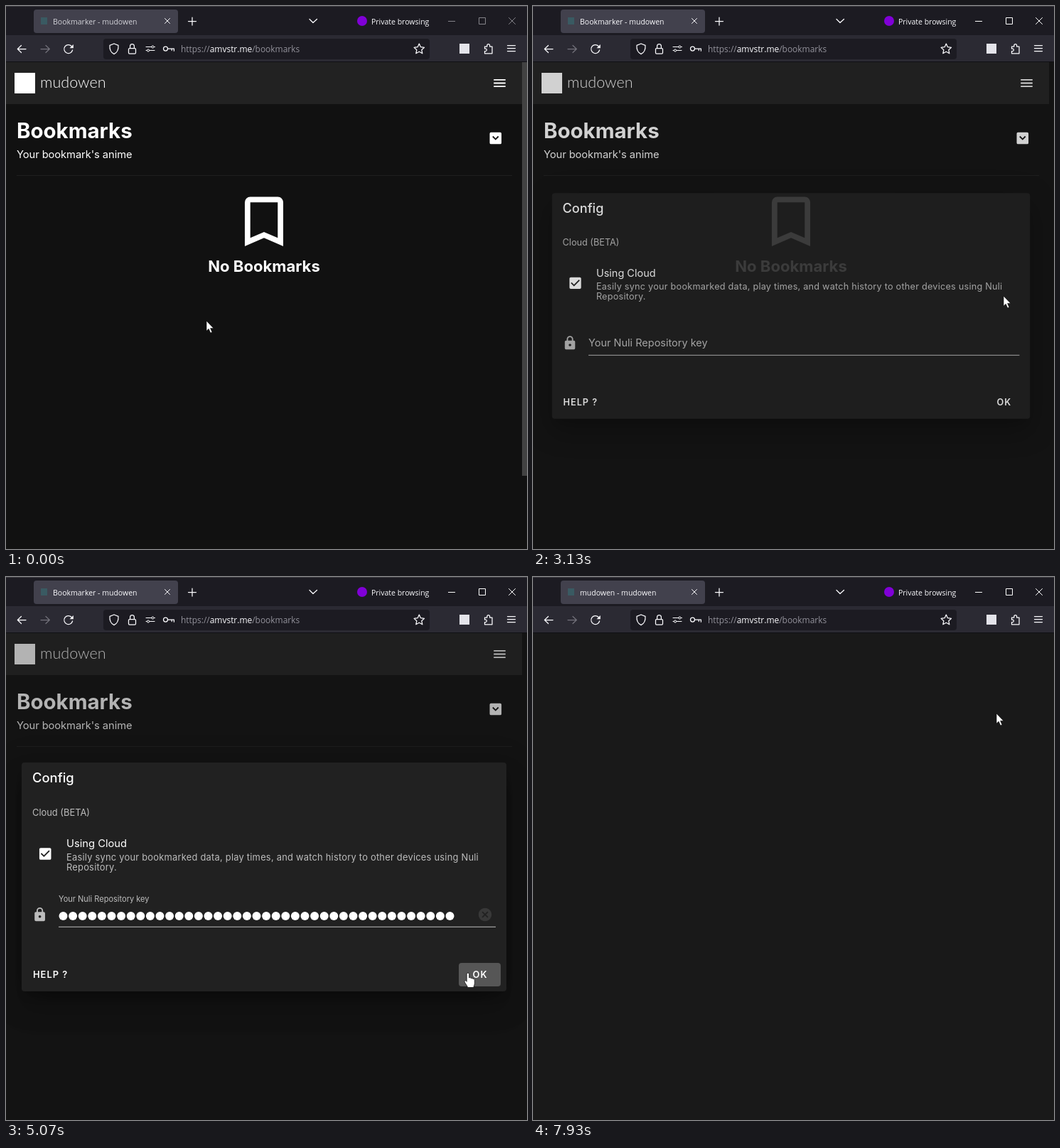
Recreate the animation shown at these times as an HTML page. Size 733x764 px, loop 8000 ms.

```html
<!DOCTYPE html>
<html lang="en">
<head>
<meta charset="utf-8">
<title>Bookmarks</title>
<style>
html, body { margin: 0; width: 100%; height: 100%; overflow: hidden; background: #111; }
svg { display: block; width: 733px; height: 764px; }
text { font-family: Inter, sans-serif; white-space: pre; }
text.ui { font-family: "Open Sans", "Noto Sans", sans-serif; }
text.brand { font-family: Lato, sans-serif; }
.line { fill: none; stroke: #fbfbfe; stroke-width: 1.25; stroke-linecap: round; stroke-linejoin: round; }
.thin { stroke-width: 1; }
</style>
</head>
<body>
<script>
const FPS = 15, LOOP = 8000, Z = 0.92;
const BRAND = 'mudowen', STORE = 'Nuli Repository', HOST = 'amvstr.me';
const SOFT = 'rgba(255,255,255,.7)';

const ICON = {
  menu: 'M3,6H21V8H3V6M3,11H21V13H3V11M3,16H21V18H3V16Z',
  down: 'M5,3H19A2,2 0 0,1 21,5V19A2,2 0 0,1 19,21H5A2,2 0 0,1 3,19V5A2,2 0 0,1 5,3M12,15L17,10L15.59,8.58L12,12.17L8.41,8.58L7,10L12,15Z',
  bookmark: 'M17,18L12,15.82L7,18V5H17M17,3H7A2,2 0 0,0 5,5V21L12,18L19,21V5C19,3.89 18.1,3 17,3Z',
  check: 'M10,17L5,12L6.41,10.58L10,14.17L17.59,6.58L19,8M19,3H5C3.89,3 3,3.89 3,5V19A2,2 0 0,0 5,21H19A2,2 0 0,0 21,19V5C21,3.89 20.1,3 19,3Z',
  lock: 'M12,17A2,2 0 0,0 14,15C14,13.89 13.1,13 12,13A2,2 0 0,0 10,15A2,2 0 0,0 12,17M18,8A2,2 0 0,1 20,10V20A2,2 0 0,1 18,22H6A2,2 0 0,1 4,20V10C4,8.89 4.9,8 6,8H7V6A5,5 0 0,1 12,1A5,5 0 0,1 17,6V8H18M12,3A3,3 0 0,0 9,6V8H15V6A3,3 0 0,0 12,3Z',
  clear: 'M12,2C17.53,2 22,6.47 22,12C22,17.53 17.53,22 12,22C6.47,22 2,17.53 2,12C2,6.47 6.47,2 12,2M15.59,7L12,10.59L8.41,7L7,8.41L10.59,12L7,15.59L8.41,17L12,13.41L15.59,17L17,15.59L13.41,12L17,8.41L15.59,7Z'
};

const rect = (x, y, w, h, fill, more = '') =>
  `<rect x="${x}" y="${y}" width="${w}" height="${h}" fill="${fill}" ${more}/>`;
const text = (x, y, size, str, fill = '#fff', more = '') =>
  `<text x="${x}" y="${y}" font-size="${size}" fill="${fill}" ${more}>${str}</text>`;
const line = (d, kind = '', more = '') => `<path class="line ${kind}" d="${d}" ${more}/>`;
const icon = (name, cx, cy, fill = '#fff', k = Z, more = '') =>
  `<path d="${ICON[name]}" fill="${fill}" fill-rule="evenodd" transform="translate(${cx - 12 * k} ${cy - 12 * k}) scale(${k})" ${more}/>`;
const group = (id, inner, more = '') => `<g id="${id}" ${more}>${inner}</g>`;
const cross = (x, y, r) => `M${x - r} ${y - r}L${x + r} ${y + r}M${x + r} ${y - r}L${x - r} ${y + r}`;

// Layered box shadow: [offset, blur, spread, alpha]
const shadow = (x, y, w, h, layers) => layers.map(([dy, blur, s, a]) =>
  rect(x - s, y + dy - s, w + 2 * s, h + 2 * s, '#000', `rx="4" opacity="${a}" style="filter:blur(${blur / 2}px)"`)).join('');

function star(cx, cy, r) {
  const pts = Array.from({ length: 10 }, (_, i) => {
    const a = -Math.PI / 2 + i * Math.PI / 5, q = i % 2 ? r * 0.48 : r;
    return `${(cx + q * Math.cos(a)).toFixed(1)} ${(cy + q * Math.sin(a)).toFixed(1)}`;
  });
  return `M${pts.join('L')}Z`;
}

function browser() {
  return rect(0, 0, 733, 41, '#1c1b22') + rect(0, 0, 733, 1, '#3d3c42') +
    rect(39, 5, 203, 33, '#42414d', 'rx="4"') +
    rect(49, 16, 9, 10, '#3a5a62', 'id="favicon"') +
    '<ellipse id="busy" cy="21" fill="#b9b9c4"/>' +
    text(66, 26, 10.5, '', '#fbfbfe', 'class="ui" id="tab"') +
    line(cross(227, 21, 3.5), 'thin') +
    line('M256.5 21.5H267.5M262 16V27') + line('M427 18.5L432 23.5L437.5 18.5') +
    '<circle cx="501" cy="21" r="7" fill="#8000d7"/>' +
    text(514, 26, 10.5, 'Private browsing', '#fbfbfe', 'class="ui"') +
    group('winbtns', `<path d="M622 21.5H632M665.5 16.5H674.5V25.5H665.5Z${cross(712, 21, 4.8)}" fill="none"/>`) +
    rect(0, 41, 733, 37, '#2b2a33') + rect(0, 78, 733, 1, '#101014') +
    rect(137, 46, 459, 29, '#1c1b22', 'rx="4"') +
    line('M28 60.5H16.5M21.5 55.5L16.3 60.5L21.5 65.5') +
    line('M49 60.5H61M56 55.5L61.3 60.5L56 65.5', '', 'style="stroke:#73727b"') +
    group('reload', line('M93.6 62A6 6 0 1 1 92 56.3') + '<path d="M94.8 54V59.2H89.6Z" fill="#fbfbfe"/>') +
    line(cross(88, 60.5, 4.7), '', 'id="stop"') +
    line('M152 53L158 55.4C158.5 62 156 65.7 152 67.6C148 65.7 145.5 62 146 55.4Z') +
    line('M173.8 59.5H181.2Q182.5 59.5 182.5 60.8V65.7Q182.5 67 181.2 67H173.8Q172.5 67 172.5 65.7V60.8Q172.5 59.5 173.8 59.5M174.6 59V56.4A2.9 2.9 0 0 1 180.4 56.4V59') +
    line('M197 57.5H204.6M204.8 57.5a1.6 1.6 0 1 0 3.2 0a1.6 1.6 0 1 0 -3.2 0M208.2 57.5H209.5M197 62.5H198M198.4 62.5a1.6 1.6 0 1 0 3.2 0a1.6 1.6 0 1 0 -3.2 0M202 62.5H209', 'thin') +
    line('M221.5 60a3 3 0 1 0 6 0a3 3 0 1 0 -6 0M227.6 60H236.4V63.2M233.2 60V62.6') +
    `<text class="ui" x="246" y="65" font-size="11.95" fill="#93929b">https://<tspan fill="#fbfbfe">${HOST}</tspan>/bookmarks</text>` +
    line(star(581.3, 60.7, 7.6)) +
    rect(638, 53, 14, 14, '#e4e4ea') +
    line('M673.5 57H676.8V55.6A1.9 1.9 0 0 1 680.6 55.6V57H684V66.8H673.5V63.5H675A1.8 1.8 0 0 0 675 60H673.5Z') +
    line('M705.5 55.5H716.5M705.5 59.5H716.5M705.5 63.5H716.5');
}

function page() {
  return rect(0, 79, 733, 685, '#111') + rect(0, 79, 726, 59, '#222') +
    rect(12, 94, 29, 29, '#fff') + text(48, 115, 21.6, BRAND, '#fff', 'class="brand" font-weight="300"') +
    icon('menu', 694.5, 108.5) +
    text(15, 186, 29.44, 'Bookmarks', '#fff', 'font-weight="700"') +
    text(15, 214, 14.72, "Your bookmark's anime", '#fff', 'letter-spacing="-.08"') +
    rect(15, 238, 697, 1, '#1f1f1f') +
    '<circle id="halo" cx="689" cy="186" r="22" fill="#fff"/>' + icon('down', 688.8, 186) +
    icon('bookmark', 363, 303.2, '#fff', 3.86) +
    text(363, 374, 22.08, 'No Bookmarks', '#fff', 'font-weight="700" text-anchor="middle"');
}

function menu() {
  const items = ['Save All (Cloud)', 'Import', 'Export', 'Clear All', 'Configure Cloud', 'Help'];
  return shadow(567, 208, 144, 280, [[5, 5, -3, .2], [8, 10, 1, .14], [3, 14, 2, .12]]) +
    rect(567, 208, 144, 280, '#212121', 'rx="4"') +
    rect(567, 392.2, 144, 44.2, '#fff', 'id="row"') +
    items.map((s, i) => text(581.5, Math.round(242.8 + i * 44.16), 14.72, s, i ? '#fff' : '#858585')).join('');
}

function dialog() {
  const dots = Array.from({ length: 41 }, (_, i) => `<circle cx="${80.5 + i * 13.6}" cy="477" r="6"/>`).join('');
  const button = 'font-weight="600" letter-spacing="1"', spaced = 'letter-spacing=".229"';
  const [first, second] = STORE.split(' ');
  return shadow(22, 261, 682, 322, [[11, 15, -7, .2], [24, 38, 3, .14], [9, 46, 8, .12]]) +
    rect(22, 261, 682, 322, '#212121', 'rx="4"') +
    text(37, 289, 18.4, 'Config', '#fff', 'font-weight="500"') +
    text(37, 336, 12.88, 'Cloud (BETA)', SOFT) +
    icon('check', 55.2, 389.5) + text(85, 380, 14.72, 'Using Cloud') +
    text(85, 399, 12.88, `Easily sync your bookmarked data, play times, and watch history to other devices using ${first}`, SOFT, spaced) +
    text(85, 413, 12.88, second + '.', SOFT, spaced) +
    icon('lock', 47.6, 475, SOFT) +
    text(0, 0, 14.72, `Your ${STORE} key`, '#fff', 'id="label"') +
    rect(74, 491.8, 615, 1, SOFT) + rect(74, 490.5, 615, 2, '#fff', 'id="under"') +
    group('dots', dots, 'fill="#fff"') + icon('clear', 674, 475, SOFT, Z, 'id="clear"') +
    rect(637, 543, 59, 33, '#fff', 'rx="4" id="okbg"') +
    text(38, 564, 12.88, 'HELP ?', '#fff', button) +
    text(667, 564, 12.88, 'OK', '#fff', button + ' text-anchor="middle"');
}

const CURSOR = {
  arrow: '<path d="M0 0V14.2L3.2 11.3L5.7 16.9L8 15.9L5.6 10.4H10Z" fill="#fff" stroke="#000" stroke-width=".6"/>',
  hand: '<path d="M-1.8 1.7A1.7 1.7 0 0 1 1.6 1.7V7C2.4 6.2 4.2 6.6 4.4 7.8C5.2 7 6.8 7.4 7 8.6C8 8 9.3 8.6 9.3 10V14.5C9.3 17 8 18 8 20.5H-.5C-.8 18.5 -3.5 15.5 -4.8 12.8C-5.4 11.4 -4 10 -2.7 11.3L-1.8 12.3Z" fill="#fff" stroke="#000" stroke-width=".7"/>',
  beam: '<path d="M-3 -7.5H-1L0 -6.8L1 -7.5H3M0 -6.8V6.8M-3 7.5H-1L0 6.8L1 7.5H3" fill="none" stroke="#e8e8e8"/>'
};

document.body.innerHTML = '<svg viewBox="0 0 733 764">' +
  group('page', page() + rect(0, 79, 733, 685, '#1a1a1a', 'id="dim"') +
    rect(726, 79, 7, 582, '#424242', 'id="thumb"') + group('menu', menu()) + group('dialog', dialog())) +
  group('blank', rect(0, 79, 733, 685, '#191919') +
    '<path id="spin" d="M290 421.5A29.5 29.5 0 1 1 260.5 392" fill="none" stroke="#fff" stroke-width="4.6"/>') +
  browser() +
  group('status', rect(-1, 745.5, 231.5, 20, '#2f2f31', 'stroke="#68686b"') + text(4, 760, 10.6, HOST, '#fbfbfe', 'class="ui"')) +
  Object.keys(CURSOR).map(k => group(k, CURSOR[k])).join('') + '</svg>';

const el = {};
document.querySelectorAll('[id]').forEach(e => el[e.id] = e);

// Piecewise linear value; keys are [tick, value]
function track(n, ...keys) {
  if (n <= keys[0][0]) return keys[0][1];
  for (let i = 1; i < keys.length; i++) {
    const [a, u] = keys[i - 1], [b, v] = keys[i];
    if (n <= b) return u + (v - u) * (n - a) / (b - a);
  }
  return keys[keys.length - 1][1];
}

// Pointer path: [tick, x, y, shape from here on]
const PATH = [
  [8, 282, 443, 'arrow'], [10, 345, 474, 'arrow'], [13, 449, 541, 'arrow'], [19, 449, 541, 'arrow'],
  [22, 560, 380, 'arrow'], [25, 672, 215, 'hand'], [27, 686, 188, 'hand'], [32, 686, 188, 'hand'],
  [34, 685, 245, 'hand'], [36, 679, 341, 'hand'], [39, 667, 395, 'hand'], [41, 662, 408, 'hand'],
  [45, 662, 408, 'arrow'], [48, 662, 408, 'arrow'], [51, 580, 466, 'beam'], [52, 560, 472, 'beam'],
  [63, 560, 472, 'beam'], [66, 605, 515, 'arrow'], [68, 640, 552, 'hand'], [69, 649, 558, 'hand'],
  [73, 650, 557, 'hand'], [79, 650, 557, 'hand'], [80, 620, 535, 'arrow'], [81, 560, 490, 'beam'],
  [83, 440, 455, 'beam'], [84, 431, 454, 'beam'], [86, 463, 460, 'beam'], [88, 463, 460, 'beam'],
  [90, 505, 440, 'arrow'], [95, 600, 388, 'arrow'], [105, 621, 350, 'arrow'], [109, 650, 281, 'arrow'],
  [113, 658, 238, 'arrow'], [119, 652, 192, 'arrow']
];

const set = (id, name, value) => el[id].setAttribute(name, value);
const fade = (id, a) => set(id, 'opacity', a);
const show = (id, on) => set(id, 'visibility', on ? 'visible' : 'hidden');
const zoom = (id, s, x, y) => set(id, 'transform', `translate(${x} ${y}) scale(${s}) translate(${-x} ${-y})`);

function pointer(n) {
  const x = track(n, ...PATH.map(p => [p[0], p[1]]));
  const y = track(n, ...PATH.map(p => [p[0], p[2]]));
  const shape = PATH.filter((p, i) => !i || p[0] <= n).pop()[3];
  for (const k in CURSOR) show(k, k === shape);
  set(shape, 'transform', `translate(${x.toFixed(1)} ${y.toFixed(1)})`);
}

function draw(n) {
  const active = n >= 28, loading = n >= 88 && n < 110, blank = n >= 97;
  set('winbtns', 'stroke', active ? '#fff' : '#85848a');
  set('tab', 'fill', active ? '#fbfbfe' : '#d2d2d8');
  el.tab.textContent = (n < 99 ? 'Bookmarker' : BRAND) + ' - ' + BRAND;
  show('favicon', !loading);
  show('busy', loading);
  const swing = 2 * Math.PI * (n - 88) / 13.6;
  set('busy', 'cx', 53 - 5.5 * Math.cos(swing));
  set('busy', 'rx', 1.7 + 1.1 * Math.abs(Math.sin(swing)));
  set('busy', 'ry', 1.8);
  const stop = n >= 89 && n < 110;
  show('stop', stop);
  show('reload', !stop);
  show('status', n >= 88 && n < 109);

  set('page', 'display', blank ? 'none' : 'inline');
  set('blank', 'display', blank ? 'inline' : 'none');
  set('spin', 'display', n >= 100 && n < 109 ? 'inline' : 'none');
  set('spin', 'transform', `rotate(${(n - 105) * 24} 260.5 421.5)`);

  fade('halo', track(n, [24, 0], [27, .08], [28, .2], [32, .2], [35, .15], [44, .15], [46, 0]));
  fade('dim', track(n, [44, 0], [45, .04], [47, .2], [50, .33], [87, .33], [88, .31], [94, 0]));
  show('thumb', n < 45 || n >= 88);
  fade('menu', track(n, [28, 0], [29, .5], [31, 1], [44, 1], [46, 0]));
  zoom('menu', track(n, [28, .7], [31, 1]), 711, 208);
  fade('row', track(n, [38, 0], [41, .06]));

  fade('dialog', track(n, [44, 0], [46, .6], [47, .85], [49, 1], [87, 1], [88, .965], [89, .6], [91, 0]));
  zoom('dialog', track(n, [44, .8], [47, .986], [49, 1], [87, 1], [88, .997], [91, .92]), 363, 422);
  const lift = track(n, [55, 0], [56, .5], [57, .85], [58, 1]);
  const focus = track(n, [55, 0], [56, .4], [58, 1], [73, 1], [76, 0]);
  set('label', 'transform', `translate(74 ${480.3 - 23.6 * lift}) scale(${1 - .25 * lift})`);
  fade('label', .7 + .3 * focus);
  fade('under', focus);
  show('dots', n >= 61);
  fade('clear', track(n, [60, 0], [63, 1], [73, 1], [76, .15]));
  fade('okbg', track(n, [67, 0], [69, .04], [73, .07], [74, .16], [76, .24]));
  pointer(n);
}

function tick() {
  draw(Math.floor((performance.now() % LOOP + 5) * FPS / 1000) % (LOOP * FPS / 1000));
  requestAnimationFrame(tick);
}
tick();
</script>
</body>
</html>
```
